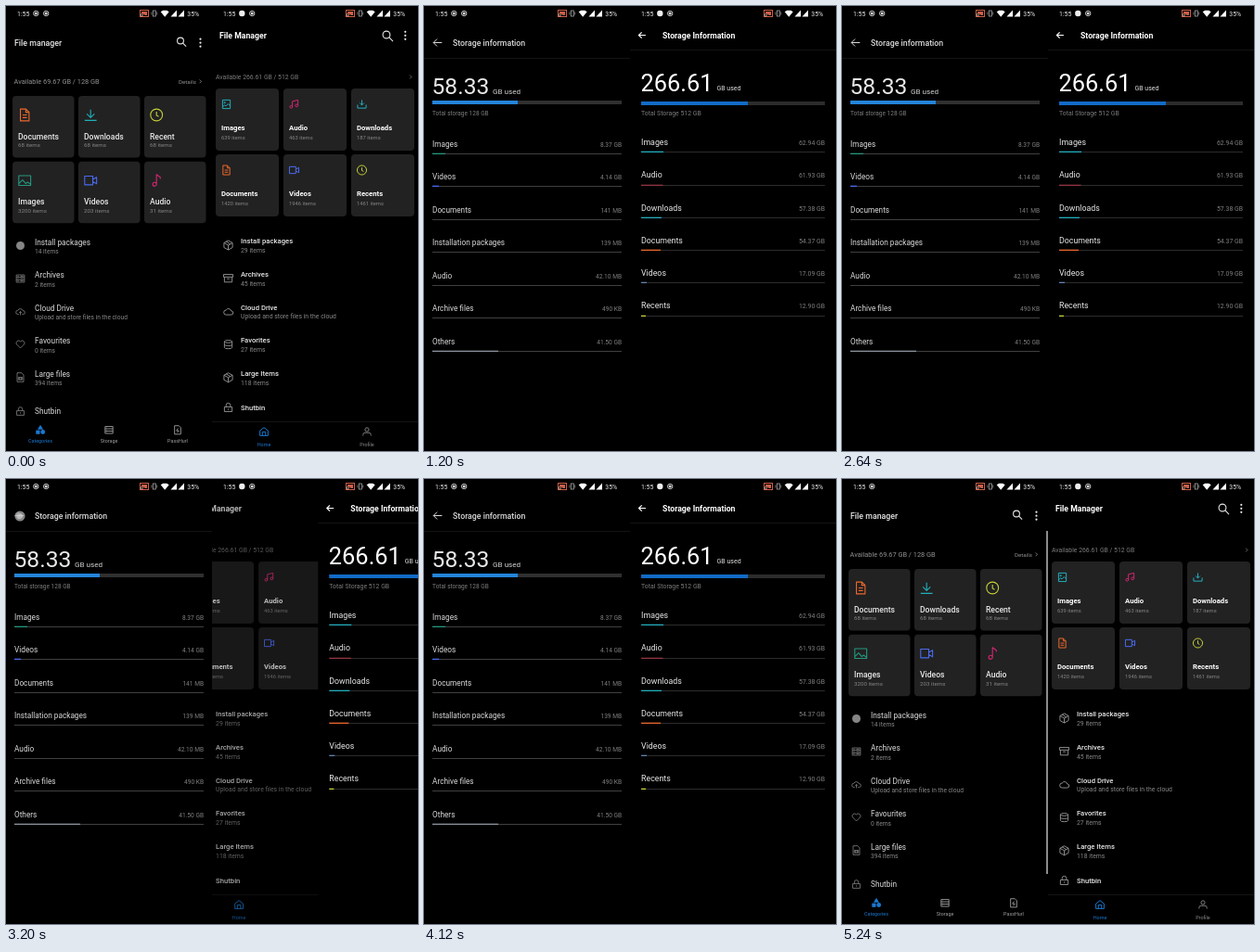
Write an HTML page with a canvas that moves like this. It is 444 px wide and 480 px high and loops after 5.28 s.

```html
<!DOCTYPE html>
<html lang="en">
<head>
<meta charset="utf-8">
<title>File manager screens</title>
<style>
html, body { margin: 0; width: 100%; height: 100%; overflow: hidden; background: #000; }
canvas { display: block; width: 444px; height: 480px; }
</style>
</head>
<body>
<canvas id="stage"></canvas>
<script>
const W = 444, H = 480, LOOP = 5280, STEP = 40, MID = 222;
const canvas = document.getElementById('stage');
const ctx = canvas.getContext('2d');
const dpr = window.devicePixelRatio || 1;
canvas.width = W * dpr;
canvas.height = H * dpr;

const CYAN = '#22aebc', ORANGE = '#ea682c', LIME = '#c6d238', BLUE = '#4a6af0',
      PINK = '#d32671', TEAL = '#24987f', ACCENT = '#1a78d0', GREY = '#868686',
      WHITE = '#e8e8e8', SOFT = '#dadada', RULE = '#141414';

// Outlines on a 24 unit grid
const ring = (x, y, r) => `M${x - r} ${y}a${r} ${r} 0 1 0 ${2 * r} 0a${r} ${r} 0 1 0 ${-2 * r} 0`;
const ICONS = {
  doc: 'M4 1h10l6 6v16H4zM14 1v6h6M8 12h8M8 17h8',
  down: 'M12 2v14M5 10l7 7 7-7M1 22h22',
  clock: ring(12, 12, 11) + 'M12 6v7l4 2',
  image: 'M1 3h22v18H1zM1 18l7-7 6 7 3-3 6 4',
  photo: 'M3 2h18v20H3zM3 18l5-4 3 2 5-5 5 5' + ring(8, 8, 1.5),
  video: 'M1 4h15v16H1zM16 10l7-4v12l-7-4',
  note: 'M12 19V1l7 5v3' + ring(8.5, 19, 3.5),
  notes: 'M8 18V5l13-3v13' + ring(5, 18, 3) + ring(18, 15, 3),
  tray: 'M12 2v12M7 9l5 5 5-5M2 13v8h20v-8',
  box: 'M12 1l10 5.5v11L12 23 2 17.5v-11zM2 6.5l10 5.5 10-5.5M12 12v11M7 3.5l10 6',
  archive: 'M1 3h22v6H1zM3 9v12h18V9M9 13h6',
  drawer: 'M2 3h20v18H2zM2 9h20M2 15h20M5 6h3M5 12h3M5 18h3M12 6h7M12 12h7M12 18h7',
  cloud: 'M7 20a5.5 5.5 0 0 1 0-11a6.5 6.5 0 0 1 12 2a4.5 4.5 0 0 1 0 9z',
  sync: 'M8 19H6a5 5 0 0 1 0-10a6.5 6.5 0 0 1 12 1a4.5 4.5 0 0 1 1 9h-3M9 15l3-3 3 3M12 12v9',
  heart: 'M12 21L3 12a5.5 5.5 0 0 1 9-7a5.5 5.5 0 0 1 9 7z',
  sheet: 'M4 1h11l5 5v17H4zM7 12h10v6H7zM10 12v6M14 12v6',
  disks: 'M3 5a9 3 0 1 0 18 0a9 3 0 1 0-18 0v14a9 3 0 0 0 18 0V5M3 12a9 3 0 0 0 18 0',
  lock: 'M3 11h18v11H3zM7 11V7a5 5 0 0 1 10 0v4M12 15v3',
  home: 'M2 10l10-8 10 8v12H2zM8 22v-9h8v9',
  user: ring(12, 7, 5) + 'M2 23v-3a5 5 0 0 1 5-5h10a5 5 0 0 1 5 5v3',
  rack: 'M2 3h20v18H2zM2 9h20M2 15h20M6 6h1M6 12h1M6 18h1',
  send: 'M4 1h11l5 5v17H4zM13 8l-4 6h6l-4 5',
  back: 'M23 12H2M11 3l-9 9 9 9',
  next: 'M8 3l9 9-9 9'
};
for (const k in ICONS) ICONS[k] = new Path2D(ICONS[k]);

function icon(name, x, y, size, color, line = 1) {
  const s = size / 24;
  ctx.save();
  ctx.translate(x - size / 2, y - size / 2);
  ctx.scale(s, s);
  ctx.strokeStyle = color;
  ctx.lineWidth = line / s;
  ctx.lineJoin = 'round';
  ctx.stroke(ICONS[name]);
  ctx.restore();
}

function text(str, x, y, size, color = WHITE, weight = 400, align = 'left') {
  ctx.font = `${weight} ${size}px Roboto, sans-serif`;
  ctx.textAlign = align;
  ctx.fillStyle = color;
  ctx.fillText(str, x, y);
}

function rect(x, y, w, h, color) {
  ctx.fillStyle = color;
  ctx.fillRect(x, y, w, h);
}

function disc(x, y, r, color) {
  ctx.fillStyle = color;
  ctx.beginPath();
  ctx.arc(x, y, r, 0, 7);
  ctx.fill();
}

function circle(x, y, r, color, line = 1) {
  ctx.strokeStyle = color;
  ctx.lineWidth = line;
  ctx.beginPath();
  ctx.arc(x, y, r, 0, 7);
  ctx.stroke();
}

function poly(points, color) {
  ctx.fillStyle = color;
  ctx.beginPath();
  points.forEach(p => ctx.lineTo(p[0], p[1]));
  ctx.fill();
}

function card(x, y, w, h) {
  ctx.fillStyle = '#222';
  ctx.beginPath();
  ctx.roundRect(x, y, w, h, 4);
  ctx.fill();
}

function tools(x, y, r, dotX, dotY) {
  circle(x, y, r, WHITE, 1.1);
  ctx.beginPath();
  ctx.moveTo(x + r * 0.7, y + r * 0.7);
  ctx.lineTo(x + r * 1.8, y + r * 1.8);
  ctx.stroke();
  for (let i = -1; i < 2; i++) disc(dotX, dotY + i * 4, 1.1, WHITE);
}

const leftCards = [
  ['Documents', 68, 'doc', ORANGE], ['Downloads', 68, 'down', CYAN], ['Recent', 68, 'clock', LIME],
  ['Images', 3200, 'image', TEAL], ['Videos', 203, 'video', BLUE], ['Audio', 31, 'note', PINK]
];
const rightCards = [
  ['Images', 639, 'photo', CYAN], ['Audio', 463, 'notes', PINK], ['Downloads', 187, 'tray', CYAN],
  ['Documents', 1420, 'doc', ORANGE], ['Videos', 1946, 'video', BLUE], ['Recents', 1461, 'clock', LIME]
];
const cloudNote = 'Upload and store files in the cloud';
const leftList = [
  ['Install packages', '14 items', ''], ['Archives', '2 items', 'drawer'],
  ['Cloud Drive', cloudNote, 'sync'], ['Favourites', '0 items', 'heart'],
  ['Large files', '394 items', 'sheet'], ['Shutbin', '', 'lock']
];
const rightList = [
  ['Install packages', '29 items', 'box'], ['Archives', '45 items', 'archive'],
  ['Cloud Drive', cloudNote, 'cloud'], ['Favorites', '27 items', 'disks'],
  ['Large Items', '118 items', 'box'], ['Shutbin', '', 'lock']
];

function leftHome(bar) {
  text('File manager', 9, 43, 8.8, WHITE, 500);
  tools(188, 37.5, 3.4, 209.5, 39.7);
  text('Available 69.67 GB / 128 GB', 8.5, 84, 7.4, '#929292');
  text('Details', 186, 83.5, 6.2, '#929292');
  icon('next', 209.5, 81.3, 5, '#929292', 0.8);
  leftCards.forEach(([name, n, ic, col], i) => {
    const x = 7 + (i % 3) * 71, y = 97 + (i > 2 ? 70.7 : 0);
    card(x, y, 66.5, 66.5);
    icon(ic, x + 13.2, y + 20.5, 14, col, 1.1);
    text(name, x + 6, y + 46.5, 8.6, WHITE, 500);
    text(n + ' items', x + 6, y + 55, 6.2, GREY);
  });
  leftList.forEach(([name, sub, ic], i) => {
    const y = 257.5 + i * 35.5 + (sub ? 0 : 4.5);
    const iy = y + (sub ? 1 : -2.5);
    if (ic) icon(ic, 15.5, iy, 10.5, '#858585', 0.8);
    else disc(15.5, iy, 4.5, '#858585');
    text(name, 31, y, 8.3, SOFT);
    if (sub) text(sub, 31, y + 9.7, 6.65, GREY);
  });
  rect(0, 445, MID, 35, '#000');
  poly([[37, 451.8], [40, 456.8], [34, 456.8]], ACCENT);
  rect(32.3, 457.6, 4.2, 4.2, ACCENT);
  disc(39.7, 459.5, 2.4, ACCENT);
  icon('rack', 111, 457.3, 10, '#a0a0a0', 0.9);
  icon('send', 185, 457.3, 10, '#a0a0a0', 0.9);
  text('Categories', 37, 471.3, 5.4, ACCENT, 400, 'center');
  text('Storage', 111, 471.3, 5.4, '#a0a0a0', 400, 'center');
  text('PassHurl', 185, 471.3, 5.4, '#a0a0a0', 400, 'center');
  if (bar) rect(220, 56, 2, 370, '#8c8c8c');
}

function rightHome() {
  text('File Manager', 230, 35, 8.7, '#fff', 700);
  tools(410, 31, 3.9, 430.3, 31.8);
  text('Available 266.61 GB / 512 GB', 226, 79, 6.85, '#7c7c7c');
  icon('next', 436, 76.5, 5, '#8a8a8a', 0.8);
  rightCards.forEach(([name, n, ic, col], i) => {
    const x = 226 + (i % 3) * 73, y = 89 + (i > 2 ? 71 : 0);
    card(x, y, 68, 67);
    icon(ic, x + 11.5, y + 17, 11, col, 1);
    text(name, x + 6, y + 45, 7.7, '#fff', 700);
    text(n + ' items', x + 6, y + 54.7, 5.8, GREY);
  });
  rightList.forEach(([name, sub, ic], i) => {
    const y = 256.3 + i * 35.7 + (sub ? 0 : 0.7);
    icon(ic, 239.5, y + (sub ? 1.7 : -2.6), 11, '#9a9a9a', 0.9);
    text(name, 253, y, 7.7, WHITE, 500);
    if (sub) text(sub, 253, y + 9.7, 6.85, GREY);
  });
  rect(MID, 448, MID, 1, RULE);
  icon('home', 278, 459, 10.5, ACCENT, 1);
  icon('user', 389, 459, 10, '#8a8a8a', 0.9);
  text('Home', 278, 474.6, 5.4, ACCENT, 400, 'center');
  text('Profile', 389, 475, 5.4, '#8a8a8a', 400, 'center');
}

function usage(rows, x, end, y0, step, size, small, color, track) {
  rows.forEach(([name, value, w, col], i) => {
    const y = y0 + i * step, lineY = Math.round(y + 7.3);
    text(name, x, y, size, color);
    text(value, end, y, small, '#808080', 400, 'right');
    rect(x, lineY, end - x, 1, track);
    if (w) rect(x, lineY - 0.3, w, 1.3, col);
  });
}

function leftStorage() {
  rect(0, 56, MID, 1, RULE);
  icon('back', 14.5, 39.5, 10.5, SOFT, 1);
  text('Storage information', 31, 43, 8.75, SOFT, 500);
  text('58.33', 8.5, 95, 24.6);
  text('GB used', 74, 94.6, 8.1, '#d0d0d0');
  rect(9, 102, 204, 4, '#303030');
  rect(9, 102, 92, 4, '#2484da');
  text('Total storage 128 GB', 9, 117.5, 6.5, '#7c7c7c');
  usage([
    ['Images', '8.37 GB', 14, TEAL], ['Videos', '4.14 GB', 7, BLUE],
    ['Documents', '141 MB', 0], ['Installation packages', '139 MB', 0],
    ['Audio', '42.10 MB', 0], ['Archive files', '490 KB', 0],
    ['Others', '41.50 GB', 71, '#8c949c']
  ], 9, 213, 151.5, 35.5, 8.25, 6.6, SOFT, '#404040');
}

function rightStorage() {
  rect(MID, 47, MID, 1, RULE);
  icon('back', 235, 31.5, 8.5, '#fff', 1.2);
  text('Storage Information', 257, 35, 8.7, '#fff', 700);
  text('266.61', 233.5, 91.5, 25.4, '#fff');
  text('GB used', 315.5, 91.2, 7, '#e0e0e0');
  rect(234, 103, 198, 4, '#2c2c2c');
  rect(234, 103, 115, 4, '#126bc6');
  text('Total Storage 512 GB', 234, 117.5, 6.9, '#7c7c7c');
  usage([
    ['Images', '62.94 GB', 24, CYAN], ['Audio', '61.93 GB', 23.5, '#933642'],
    ['Downloads', '57.38 GB', 22, CYAN], ['Documents', '54.37 GB', 21, ORANGE],
    ['Videos', '17.09 GB', 6, '#6284b4'], ['Recents', '12.90 GB', 5, LIME]
  ], 234, 432, 150, 35.25, 8.8, 6.9, WHITE, '#2c2c2c');
}

function target(x) {
  circle(x, 8, 2.7, '#ddd', 0.9);
  disc(x, 8, 1.5, '#ddd');
}

function status(x, first, second) {
  text('1:55', x + 12, 11, 6.9);
  first(x + 32.3);
  if (second) target(x + 43.2);
  ctx.strokeStyle = '#cf5f48';
  ctx.lineWidth = 1;
  ctx.strokeRect(x + 144.5, 4.5, 9, 7);
  poly([[x + 146, 6], [x + 152, 6], [x + 152, 10], [x + 150, 10], [x + 146, 7.5]], '#cf5f48');
  circle(x + 146.3, 9.7, 1.2, '#e8c4b8', 0.8);
  ctx.strokeStyle = '#a8a8a8';
  ctx.lineWidth = 0.8;
  ctx.strokeRect(x + 158.3, 5, 3, 6);
  rect(x + 156.5, 6.5, 0.8, 3, '#888');
  rect(x + 162.4, 6.5, 0.8, 3, '#888');
  poly([[x + 166.7, 6.3], [x + 169.2, 4.8], [x + 173.2, 4.8], [x + 175.7, 6.3], [x + 171.2, 11.8]], '#fff');
  for (const s of [184, 192]) poly([[x + s, 4.5], [x + s, 11.5], [x + s - 6.5, 11.5]], '#fff');
  text('35%', x + 195.3, 11, 6.9);
}

// Each visit: time the storage page opens, time it closes
const visits = [[560, 1500], [2200, 3140], [3860, 4800]];
const SLIDE = 280;
const ease = p => 1 - Math.pow(1 - Math.min(1, Math.max(0, p)), 3);

function openness(t, lag) {
  let v = 0;
  for (const [a, b] of visits) v += ease((t - a) / SLIDE) - ease((t - b - lag) / SLIDE);
  return v;
}

function phone(x, v, home, storage) {
  const page = (dx, alpha, draw) => {
    ctx.save();
    ctx.translate(dx, 0);
    rect(x, 17, MID, H - 17, '#000');
    ctx.globalAlpha = alpha;
    draw();
    ctx.restore();
  };
  ctx.save();
  ctx.beginPath();
  ctx.rect(x, 17, MID, H - 17);
  ctx.clip();
  if (v < 0.999) page(-v * MID * 0.25, 1 - v * 0.6, home);
  if (v > 0.001) page((1 - v) * MID, 1, storage);
  ctx.restore();
}

function touch(x, y, t, from, to) {
  if (t < from || t > to) return;
  disc(x, y, 5.6, 'rgba(175,175,175,.75)');
  disc(x, y, 3, 'rgba(225,225,225,.6)');
}

function draw(t) {
  ctx.setTransform(dpr, 0, 0, dpr, 0, 0);
  rect(0, 0, W, H, '#000');
  phone(0, openness(t, 80), () => leftHome(t > 1500), leftStorage);
  phone(MID, openness(t, 0), rightHome, rightStorage);
  status(0, target, t < 4200);
  status(MID, x => disc(x, 8, 3.2, '#eee'), true);
  for (const [a, b] of visits) {
    touch(151, 81, t, a - 100, a + 20);
    touch(376, 75.5, t, a - 100, a + 20);
    touch(15, 40, t, b - 20, b + 80);
    touch(236, 27.5, t, b - 100, b + 20);
  }
}

const start = performance.now();
function frame() {
  const t = (performance.now() - start) % LOOP;
  draw(Math.floor(t / STEP) * STEP);
  requestAnimationFrame(frame);
}
frame();
</script>
</body>
</html>
```
